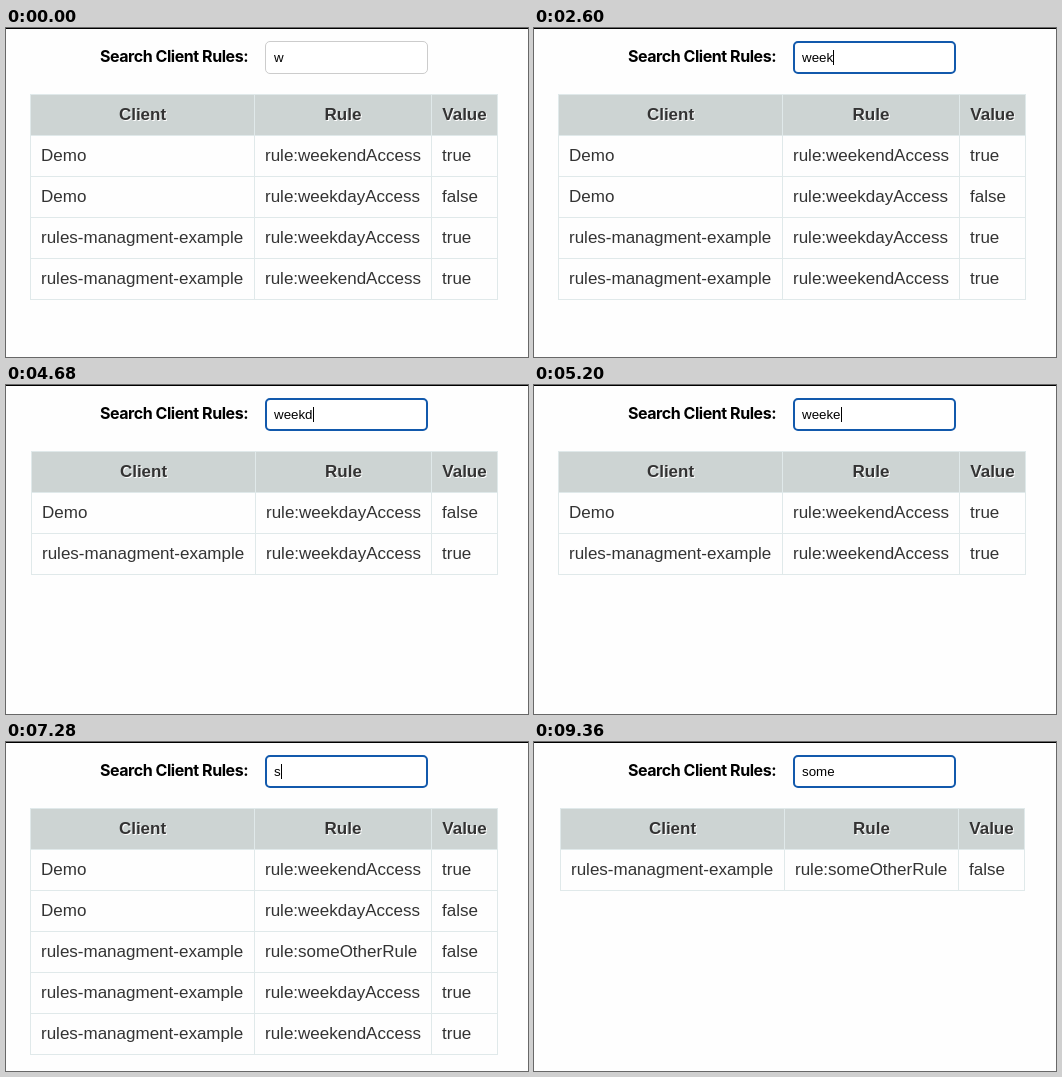
An HTML page for the animation above (9.49 s loop, 522 px wide and 329 px high).

```html
<!DOCTYPE html>
<html lang="en">
<head>
<meta charset="utf-8">
<title>Client rule search</title>
<style>
  html, body { margin: 0; width: 100%; height: 100%; overflow: hidden; background: #fefefe; }
  svg { display: block; width: 522px; height: 329px; }
  text { font: 17px "Liberation Sans", Arial, sans-serif; fill: #333; }
  .head text { font-weight: 700; text-anchor: middle; }
  .head { filter: drop-shadow(1px 1px 0.5px #fff); }
  .grid { fill: none; stroke: #e0e9ea; }
  #label { font: 700 16px Inter, sans-serif; letter-spacing: -0.45px; fill: #000; }
  #typed { font-size: 13.333px; fill: #000; }
</style>
</head>
<body>
<svg viewBox="0 0 522 329">
  <rect width="522" height="1" fill="#000"/>
  <text id="label" x="94" y="34">Search Client Rules:</text>
  <rect id="field" fill="#fff"/>
  <text id="typed" x="268" y="34"></text>
  <rect id="caret" y="22" width="1" height="15" fill="#000"/>
  <g id="table"></g>
</svg>
<script>
const LOOP = 9490, TOP = 66, ROW = 41;
const $ = id => document.getElementById(id);

const rules = [
  ["Demo", "rule:weekendAccess", "true"],
  ["Demo", "rule:weekdayAccess", "false"],
  ["rules-managment-example", "rule:someOtherRule", "false"],
  ["rules-managment-example", "rule:weekdayAccess", "true"],
  ["rules-managment-example", "rule:weekendAccess", "true"]
];

// start time, query, caret shown
const steps = [
  [0, "w", 0], [1300, "w", 1], [1820, "w", 0],
  [2080, "we", 1], [2340, "wee", 1], [2600, "week", 1], [3120, "weekd", 1],
  [3510, "weekda", 1], [4030, "weekda", 0], [4550, "weekda", 1],
  [4680, "weekd", 1], [4810, "week", 1], [5070, "weeke", 1], [5720, "weeken", 1],
  [5980, "weeke", 1], [6110, "week", 1], [6240, "wee", 1],
  [6500, "we", 1], [6630, "w", 1], [6760, "", 1],
  [7280, "s", 1], [7410, "so", 1], [7670, "som", 1], [7800, "some", 1],
  [8320, "some", 0], [8840, "some", 1], [9360, "some", 0]
];

// Column edges follow the widest rule name in the result.
function columns(rows) {
  const has = word => rows.some(r => r[1].includes(word));
  if (has("weekend")) return [24, 248, 425, 491];
  if (has("weekday")) return [25, 249, 425, 491];
  return [26, 250, 424, 490];
}

const text = (x, y, s) => `<text x="${x}" y="${y}">${s}</text>`;

function drawTable(query) {
  const rows = rules.filter(r => r[1].toLowerCase().includes(query));
  const xs = columns(rows), left = xs[0], right = xs[3];
  const bottom = TOP + ROW * (rows.length + 1);
  let lines = "";
  for (const x of xs) lines += `M${x + 0.5} ${TOP}V${bottom + 1}`;
  for (let y = TOP; y <= bottom; y += ROW) lines += `M${left} ${y + 0.5}H${right + 1}`;
  const head = ["Client", "Rule", "Value"]
    .map((s, i) => text((xs[i] + xs[i + 1] + 1) / 2, TOP + 26, s)).join("");
  const body = rows.map((r, j) =>
    r.map((s, i) => text(xs[i] + 11, TOP + 26 + ROW * (j + 1), s)).join("")).join("");
  $("table").innerHTML =
    `<rect x="${left}" y="${TOP}" width="${right - left}" height="${ROW}" fill="#cdd4d3"/>` +
    `<path class="grid" d="${lines}"/><g class="head">${head}</g>${body}`;
}

function drawField(focused) {
  const w = focused ? 2 : 1;
  const box = {
    x: 259 + w / 2, y: 13 + w / 2, width: 163 - w, height: 33 - w,
    rx: 5 - w / 2, stroke: focused ? "#1259ac" : "#ccc", "stroke-width": w
  };
  for (const k in box) $("field").setAttribute(k, box[k]);
}

let current = -1;
function show(i) {
  const [time, query, caret] = steps[i];
  drawField(time > 0);
  $("typed").textContent = query;
  const end = query ? $("typed").getComputedTextLength() : 0;
  $("caret").setAttribute("x", Math.round(268 + end));
  $("caret").setAttribute("opacity", caret);
  drawTable(query);
}

const start = performance.now();
function tick() {
  const t = (performance.now() - start) % LOOP;
  const i = steps.findLastIndex(s => s[0] <= t);
  if (i !== current) show(current = i);
  requestAnimationFrame(tick);
}
tick();
</script>
</body>
</html>
```
